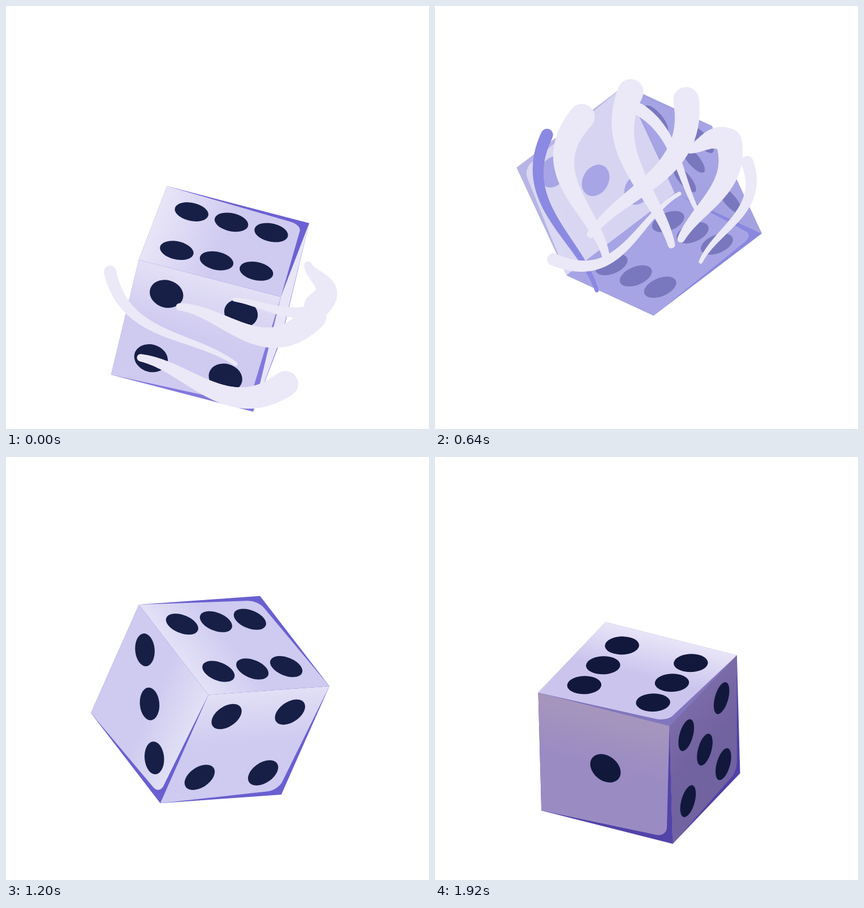
Write an HTML page with a canvas that moves like this. It is 748 px wide and 748 px high and loops after 2000 ms.

```html
<!DOCTYPE html>
<html lang="en">
<head>
<meta charset="utf-8">
<title>Rolling die</title>
<style>
html, body { margin: 0; width: 100%; height: 100%; overflow: hidden; background: #fff; }
canvas { display: block; }
</style>
</head>
<body>
<canvas id="stage" width="748" height="748"></canvas>
<script>
const ctx = document.getElementById('stage').getContext('2d');
const LIGHT = '#ebe8f7', PURPLE = '#8b89e2', NAVY = '#171f47', INK = '#12183c';
const CENTER_X = 361, SCALE = [261, 250], PITCH = 33.5;

// The pitch is constant; spin slows down while the die rolls over once.
const motion = [
  { t: 0, y: 518, spin: -4, roll: 13 },
  { t: 240, y: 214, spin: 191, roll: -40 },
  { t: 640, y: 344, spin: 475, roll: -204 },
  { t: 880, y: 394, spin: 602, roll: -305 },
  { t: 1040, y: 456, spin: 684, roll: -322 },
  { t: 1200, y: 429, spin: 763, roll: -337 },
  { t: 1600, y: 470, spin: 896, roll: -364 },
  { t: 1920, y: 488, spin: 962, roll: -361.5 }
];

// Faces 0..2 look along +axis, 3..5 along -axis: "light main edge pip".
// Trails: tail x y, head x y, bend as a share of the length, colour.
const looks = [
  { t: 0,
    faces: { 2: `#e8e5f8 #cfcaf0 #6c61d2 ${NAVY}`, 0: `#e3e0f6 #cfcaf0 #8278de ${NAVY}`, 4: '#e8e5f7 #e8e5f7 #6c61d2 #e8e5f7' },
    wide: [[307, 532, 544, 549, 0.18], [238, 622, 494, 668, 0.15], [534, 458, 550, 530, -0.3]],
    thin: [[406, 633, 184, 470, -0.13], [404, 519, 550, 537, 0.07]] },
  { t: 240,
    faces: { 2: '#dbd8f6 #cac7f0 #bcb9ea #a09fd6', 3: '#dad4f6 #d4cff4 #cdc9f1 #a5a3d8', 4: '#a9a6db #9c9ad4 #8580e3 #6e69b3' },
    wide: [[265, 159, 494, 100, -0.18], [335, 243, 555, 208, -0.23], [360, 318, 523, 300, 0.15], [466, 228, 521, 300, -0.15]],
    thin: [[206, 150, 458, 40, -0.14, PURPLE], [356, 202, 550, 205, 0.1], [482, 280, 198, 153, -0.12],
      [360, 318, 520, 190, 0], [397, 380, 505, 347, 0.18]] },
  { t: 640,
    faces: { 1: '#dad8f2 #d6d4f1 #b7b5e5 #a7a5e5', 2: '#a6a4e4 #a6a4e4 #8a87df #7978bf', 3: '#a3a1df #a6a4e4 #a3a0e2 #7978bf' },
    wide: [[303, 447, 260, 196, -0.18], [418, 422, 346, 152, -0.12], [275, 404, 444, 166, 0.14],
      [435, 412, 520, 242, 0.12], [450, 254, 520, 240, -0.15]],
    thin: [[286, 503, 198, 228, -0.14, PURPLE], [470, 452, 552, 276, 0.15], [432, 332, 209, 448, -0.18], [466, 366, 361, 183, 0.08]] },
  { t: 880,
    faces: { 4: '#cdc3e9 #cac0e8 #aba2e1 #7778a5', 2: '#cfc8eb #d5ceef #aaa1e2 #8785ab', 3: '#b4b0e8 #aeaae5 #a59fe0 #66659f' },
    wide: [[226, 462, 427, 579, 0.2]],
    thin: [[400, 432, 543, 370, 0.1, '#e0daf2'], [376, 532, 211, 284, -0.11], [200, 403, 530, 381, -0.1]] },
  { t: 1200,
    faces: { 2: `#e3e1f7 #cecaf0 #6a5fd0 ${NAVY}`, 0: `#e2dff6 #cecaf0 #6a5fd0 ${NAVY}`, 1: `#e2e0f6 #cecaf0 #6a5fd0 ${NAVY}` } },
  { t: 1600,
    faces: { 2: `#e4e1f7 #cac5ef #5c50b8 ${INK}`, 3: `#9b94ac #867daa #594eb0 ${INK}`, 1: `#d6d2f1 #c9c4ee #594eb0 ${INK}` } },
  { t: 1920,
    faces: { 2: `#e8e5f8 #cbc5ee #8276be ${INK}`, 4: `#a696bd #9a8bc3 #5143a8 ${INK}`, 3: `#7b6ba8 #7162a0 #5040a8 ${INK}` } }
];

const roundCorner = [0, 3, 0, 1, 0, 0];
const a = 0.262, b = 0.28;
const four = [[-a, -b], [a, -b], [-a, b], [a, b]];
const pips = [
  four,
  [[b, -a], [0, 0], [-b, a]],
  [-a, a].flatMap(u => [-b, 0, b].map(v => [u, v])),
  [...four, [0, 0]],
  [[0, 0]],
  [[a, b], [-a, -b]]
];

const lerp = (p, q, k) => p + (q - p) * k;

function stateAt(t) {
  const i = Math.max(1, motion.findIndex(m => m.t >= t));
  const p = motion[i - 1], q = motion[i], k = (t - p.t) / (q.t - p.t);
  const mix = name => lerp(p[name], q[name], k);
  return { y: mix('y'), spin: mix('spin'), roll: mix('roll') };
}

// Projected die axes [x, y, depth towards the viewer].
function axesFor(spin, roll) {
  const [s, r, p] = [spin, roll, PITCH].map(d => d * Math.PI / 180);
  const right = [Math.cos(r), Math.sin(r), 0];
  const front = [-Math.sin(r) * Math.sin(p), Math.cos(r) * Math.sin(p), Math.cos(p)];
  const up = [Math.sin(r) * Math.cos(p), -Math.cos(r) * Math.cos(p), Math.sin(p)];
  const around = angle => front.map((n, i) => n * Math.cos(angle) + right[i] * Math.sin(angle));
  return [around(s), around(s - Math.PI / 2), up].map(([x, y, z]) => [x * SCALE[0], y * SCALE[1], z]);
}

function drawFace(id, axes, y, style) {
  const [light, main, edge, pip] = style.split(' ');
  const n = id % 3, sign = id < 3 ? 0.5 : -0.5;
  const u = axes[(n + 1) % 3], v = axes[(n + 2) % 3];
  ctx.setTransform(u[0], u[1], v[0], v[1], CENTER_X + axes[n][0] * sign, y + axes[n][1] * sign);

  ctx.fillStyle = edge;
  ctx.fillRect(-0.5, -0.5, 1, 1);

  // Lighter panel touching three corners, rounded at the fourth.
  const quad = [[-0.5, -0.5], [0.5, -0.5], [0.5, 0.5], [-0.5, 0.5]];
  const at = i => quad[(roundCorner[id] + i) % 4];
  const shade = id === 4 ? ctx.createLinearGradient(0.5, 0, -0.5, 0) : ctx.createLinearGradient(0, 0.5, 0, -0.5);
  shade.addColorStop(0, light);
  shade.addColorStop(0.5, main);
  ctx.fillStyle = shade;
  ctx.beginPath();
  ctx.moveTo(...at(3));
  ctx.arcTo(...at(0).map(c => c * 0.91), ...at(1), 0.09);
  ctx.lineTo(...at(1));
  ctx.lineTo(...at(2));
  ctx.fill();

  ctx.fillStyle = pip;
  for (const [pu, pv] of pips[id]) {
    ctx.beginPath();
    ctx.arc(pu, pv, 0.116, 0, 7);
    ctx.fill();
  }
}

// A brush stroke that swells and curls towards its head.
function drawTrail([x0, y0, x1, y1, bend, colour = LIGHT], width) {
  const dx = x1 - x0, dy = y1 - y0, steps = 60;
  const at = k => {
    const off = bend * 6.75 * k * k * (1 - k);
    return [x0 + dx * k - dy * off, y0 + dy * k + dx * off];
  };
  ctx.strokeStyle = colour;
  ctx.lineCap = 'round';
  for (let i = 0; i < steps; i++) {
    ctx.lineWidth = width * lerp(0.25, 1, i / steps) + 2;
    ctx.beginPath();
    ctx.moveTo(...at(i / steps));
    ctx.lineTo(...at((i + 1) / steps));
    ctx.stroke();
  }
}

function draw(t) {
  const { y, spin, roll } = stateAt(t);
  const axes = axesFor(spin, roll);
  const [near, next] = [...looks].sort((p, q) => Math.abs(p.t - t) - Math.abs(q.t - t));

  ctx.setTransform(1, 0, 0, 1, 0, 0);
  ctx.fillStyle = '#fff';
  ctx.fillRect(0, 0, 748, 748);

  const spare = Object.values(near.faces)[1];
  for (let id = 0; id < 6; id++) {
    const facing = axes[id % 3][2] * (id < 3 ? 1 : -1);
    if (facing > 0) drawFace(id, axes, y, near.faces[id] || next.faces[id] || spare);
  }

  ctx.setTransform(1, 0, 0, 1, 0, y - stateAt(near.t).y);
  for (const trail of near.thin || []) drawTrail(trail, 20);
  for (const trail of near.wide || []) drawTrail(trail, 44);
}

const start = performance.now();
function tick() {
  const t = (performance.now() - start) % 2000;
  draw(Math.floor(t / 80) * 80);
  requestAnimationFrame(tick);
}
tick();
</script>
</body>
</html>
```
